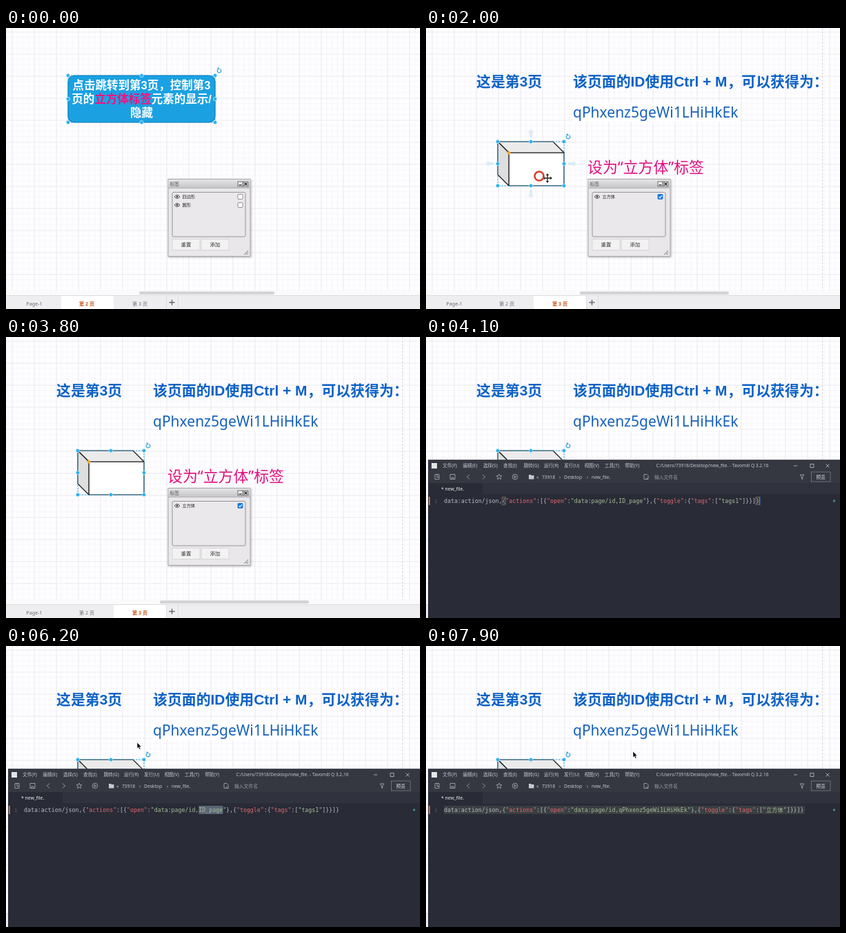
These frames come from a looping animation (600 by 408 pixels, 8 s). An HTML page:

```html
<!DOCTYPE html>
<html lang="zh-CN">
<head>
<meta charset="utf-8">
<style>
  html, body { margin: 0; width: 100%; height: 100%; overflow: hidden; background: #fff; }
  svg { display: block; width: 600px; height: 408px; }
  text { font-family: "Noto Sans", "Noto Sans CJK SC", sans-serif; }
  .title { font-family: "Liberation Sans", "Noto Sans CJK SC", sans-serif; font-weight: 700; }
  .mono { font-family: "DejaVu Sans Mono", "Noto Sans CJK SC", monospace; }
  .mid { text-anchor: middle; }
  .strong { font-weight: 700; }
  .key { fill: #e0696f; }
  .str { fill: #a9bd9b; }
</style>
</head>
<body>
<svg id="stage" viewBox="0 0 600 408"></svg>
<script>
const stage = document.getElementById('stage');
const pageKey = 'qPhxenz5geWi1LHiHkEk';

const text = (x, y, size, str, fill, cls = '') =>
  `<text x="${x}" y="${y}" font-size="${size}" fill="${fill}" class="${cls}">${str}</text>`;
const rect = (x, y, w, h, fill, extra = '') =>
  `<rect x="${x}" y="${y}" width="${w}" height="${h}" fill="${fill}" ${extra}/>`;
const line = (d, stroke, width = 1, extra = '') =>
  `<path d="${d}" fill="none" stroke="${stroke}" stroke-width="${width}" ${extra}/>`;
const group = (id, body) => `<g id="${id}">${body}</g>`;

function selection(x, y, w, h) {
  let out = rect(x, y, w, h, 'none', 'stroke="#29a3e0" stroke-dasharray="2.4 1.6"');
  for (const i of [0, .5, 1]) for (const j of [0, .5, 1])
    if (i !== .5 || j !== .5)
      out += `<circle cx="${x + w * i}" cy="${y + h * j}" r="2.7" fill="#29b0ee" stroke="#e8f6ff" stroke-width=".6"/>`;
  const cx = x + w + 6, cy = y - 7;
  return out + line(`M${cx + 1.6} ${cy - 2.2} A2.8 2.8 0 1 1 ${cx - 1.6} ${cy - 2.2} M${cx - 2.6} ${cy - 3.6} h2.2 v2.2`, '#1f9cd8', 1.1);
}

function tabBar(active, thumbX, thumbW) {
  const tab = (label, i) => {
    const on = i === active;
    return rect([0, 80, 156][i], 389, 76, 19, on ? '#fff' : '#eeeef1') +
      text([41, 117, 194][i], 403, 7.2, label, on ? '#c8571b' : '#6b6b70', on ? 'mid strong' : 'mid');
  };
  return rect(0, 381, 600, 7, '#fafafb') + rect(thumbX, 382.5, thumbW, 4.5, '#d3d3d6', 'rx="2"') +
    rect(0, 388, 600, 20, '#eeeef1') + ['Page-1', '第 2 页', '第 3 页'].map(tab).join('') +
    line('M0 388.5 H600 M232.5 389 V408 M249.5 389 V408', '#dcdce0') +
    line('M236.5 398.5 h8 M240.5 394.5 v8', '#66666b', 1.4);
}

function tagPanel(rows, checked) {
  const button = (x, label) => rect(x, 306.5, 40, 16, '#f3f2f3', 'stroke="#d2d0d2" stroke-width=".8"') +
    text(x + 20, 317.2, 7.4, label, '#333', 'mid');
  const row = (label, i) => {
    const y = 245 + 12 * i;
    return line(`M244 ${y} q4 -5 8 0 q-4 5 -8 0 z`, '#444', .9) + `<circle cx="248" cy="${y}" r="1.4" fill="#444"/>` +
      text(255.5, y + 2.4, 6.2, label, '#222') +
      rect(336, y - 3.5, 7, 7, checked ? '#1473e0' : '#fff', `rx="1" stroke="${checked ? '#1473e0' : '#777'}" stroke-width=".8"`) +
      (checked ? line(`M337.5 ${y} l1.6 1.8 l2.9 -3.6`, '#fff', 1.2) : '');
  };
  return rect(235, 219.5, 119, 112, '#e9e7e9', 'stroke="#a5a5a8" filter="url(#shadow)"') +
    rect(235.5, 220, 118, 12, 'url(#bar)') + line('M235 232.5 H354', '#aaa', .8) +
    text(237.5, 228.8, 6.8, '标签', '#555') +
    [336, 344].map(x => rect(x, 223, 7, 7, '#eee', 'stroke="#555" stroke-width=".8"')).join('') +
    line('M337.5 228 h4', '#111', 1.2) + line('M345.5 224.5 l4 4 m0 -4 l-4 4', '#111', 1.1) +
    rect(241, 238.5, 106, 64.5, '#ebe8eb', 'rx="2" stroke="#8d8b8d" stroke-width=".9"') +
    rows.map(row).join('') + button(241, '重置') + button(283, '添加') +
    [6, 3.5, 1.5].map(d => line(`M${351 - d} 329 l${d} ${-d}`, '#666', .8)).join('');
}

const pageTwo = group('pageTwo',
  rect(90, 69, 213, 68, '#1ba1e2', 'rx="9" stroke="#0072b0" stroke-width="1.2"') +
  ['点击跳转到第3页，控制第3', '页的<tspan fill="#f5107f">立方体标签</tspan>元素的显示/', '隐藏']
    .map((s, i) => text(196.5, 89.3 + 20 * i, 16.5, s, '#fff', 'title mid')).join('') +
  selection(90, 69, 213, 68) + tagPanel(['四边形', '圆形'], false) + tabBar(1, 193, 196));

const hoverArrow = (x, y, angle) =>
  `<path d="M0 -6 l4.5 5 h-2.5 v7 h-4 v-7 h-2.5 z" fill="#dcecf6" transform="translate(${x} ${y}) rotate(${angle})"/>`;

const pageThree = group('pageThree',
  line('M574.5 0 V381', '#d5d5dc', 1, 'stroke-dasharray="3 2"') +
  text(73, 84.5, 20.9, '这是第3页', '#0b61c6', 'title') +
  text(213, 84.5, 20.9, '该页面的ID使用Ctrl + M，可以获得为：', '#0b61c6', 'title') +
  rect(213, 108, 241, 28, '#fff') + text(213, 130, 21, pageKey, '#1560bd') +
  text(234, 209.5, 21.9, '设为“立方体”标签', '#e2107f') +
  `<g stroke="#111" stroke-width="1.1" stroke-linejoin="round">
    <path d="M120 181 H200 V229 H120 z" fill="#fff"/>
    <path d="M104 165 H184 L200 181 H120 z" fill="#ebebeb"/>
    <path d="M104 165 L120 181 V229 L104 213 z" fill="#dedede"/></g>` +
  selection(104, 165, 96, 64) + '<path d="M120 178 l3 3 l-3 3 l-3 -3 z" fill="#f5a623"/>' +
  group('hover', hoverArrow(152, 153, 0) + hoverArrow(212, 197, 90) + hoverArrow(152, 241, 180) + hoverArrow(92, 197, 270)) +
  tagPanel(['立方体'], true) + tabBar(2, 223, 216));

const menus = ['文件(F)', '编辑(E)', '选择(S)', '查找(I)', '跳转(G)', '运行(R)', '发行(U)', '视图(V)', '工具(T)', '帮助(Y)'];
const crumbs = [[160, '«'], [168, '73918'], [193, '›'], [200, 'Desktop'], [233, '›'], [240, 'new_file.']];
const icon = (x, d) => line(d, '#aeb1ba', .8, `transform="translate(${x} 203)"`);
const toolbar =
  icon(16, 'M-3 -3.5 h6 v7 h-6 z M0 -3.5 v4 h3') +
  icon(38.5, 'M-3.5 -3.5 h7 v7 h-7 z M-1.5 3 v-2 h3 v2') +
  icon(61, 'M2 -3.5 l-3.5 3.5 l3.5 3.5') +
  icon(84, 'M-2 -3.5 l3.5 3.5 l-3.5 3.5') +
  icon(106, 'M0 -4 L1.2 -1.3 H4 L1.8 .6 L2.5 3.5 L0 2 L-2.5 3.5 L-1.8 .6 L-4 -1.3 H-1.2 z') +
  icon(129, 'M-3.8 0 a3.8 3.8 0 1 0 7.6 0 a3.8 3.8 0 1 0 -7.6 0 M-1 -1.8 l2.8 1.8 l-2.8 1.8 z') +
  icon(319, 'M-3 -3.5 h4 l2 2 v5 h-6 z M0 1 l3 3') +
  icon(545, 'M-3 -3 h6 l-2.3 3 v3.5 l-1.4 -1 v-2.5 z');

// The code line, built from coloured tokens
const charW = 4.967, codeX = 26;
const uri = rest => ['data', rest].join(':');
const key = s => `<tspan class="key">"${s}"</tspan>`;
const str = s => `<tspan class="str">"${s}"</tspan>`;
const slot = id => `<tspan id="${id}"></tspan>`;
const codeLine = uri('action/json,') + `{${key('actions')}:[{${key('open')}:${str(uri('page/id,') + slot('pageId'))}},` +
  `{${key('toggle')}:{${key('tags')}:[${str(slot('tag'))}]}}]}`;
const bracketBox = i => rect(codeX + i * charW, 232.5, charW, 11, 'none', 'stroke="#8a8068" stroke-width=".7"');

const editor = group('editor',
  rect(3, 178.5, 597, 230, '#292b36') + rect(3, 178.5, 597, 33.5, '#353741') + rect(3, 212, 597, 16.5, '#30323d') +
  rect(4, 212, 78, 17, '#292b36') + line('M3 178.5 H600', '#4a4c55', .8) +
  rect(8, 183, 8, 8, '#e4e5e8') +
  menus.map((m, i) => text(24 + i * 29.35, 189.2, 6.7, m, '#c6c8cf')).join('') +
  text(333.5, 189.2, 6.6, 'C:/Users/73918/Desktop/new_file. - Tavomill Q 3.2.16', '#c6c8cf') +
  line('M533 187 h5 M557 184.5 h5 v5 h-5 z M579.5 184.5 l5 5 m0 -5 l-5 5', '#c6c8cf', .8) +
  toolbar + '<path d="M149 200 h3 l1 1 h3.5 v5.5 h-7.5 z" fill="#c6c8cf"/>' +
  crumbs.map(([x, s]) => text(x, 205.6, 6.7, s, '#c6c8cf')).join('') +
  text(331, 205.6, 6.8, '输入文件名', '#9a9da7') +
  rect(558.5, 196, 27.5, 14, 'none', 'stroke="#72757f" stroke-width=".9"') + text(572, 205.8, 6.8, '预览', '#e2e3e7', 'mid') +
  text(22, 222.8, 6.8, '* new_file.', '#f0f0f2') +
  rect(4, 232, 1.7, 12, '#d9825a') + text(12, 240.8, 7, '1', '#52606a', 'mono') +
  '<circle cx="591.5" cy="238" r="1.8" fill="#3d8791"/>' +
  group('word', rect(279.3, 232, 35, 12, '#5b6675')) + group('all', rect(codeX, 232, 523, 12, '#3a3f42')) +
  group('caret', bracketBox(17) + bracketBox(91) + rect(483.2, 232, 1.2, 12, '#4d83d6')) +
  text(codeX, 240.8, 8.25, codeLine, '#b9bdc6', 'mono'));

const arrowHeads = [0, 90, 180, 270]
  .map(a => `<path d="M7 0 l-3 -2.2 v4.4 z" fill="#222" transform="rotate(${a})"/>`).join('');

stage.innerHTML = `<defs>
  <pattern id="grid" x="8.5" y="5.5" width="32" height="32" patternUnits="userSpaceOnUse">
    <path d="M8 0 V32 M16 0 V32 M24 0 V32 M0 8 H32 M0 16 H32 M0 24 H32" stroke="#f5f4f8"/>
    <path d="M0 0 V32 M0 0 H32" stroke="#e4e3ea" stroke-width="1.6"/>
  </pattern>
  <linearGradient id="bar" x2="0" y2="1"><stop stop-color="#e6e6e7"/><stop offset="1" stop-color="#c5c5c7"/></linearGradient>
  <filter id="shadow"><feDropShadow dx="1" dy="1" stdDeviation="1.5" flood-opacity=".3"/></filter>
</defs>` + rect(0, 0, 600, 408, '#fefdff') + rect(0, 0, 600, 381, 'url(#grid)') + pageTwo + pageThree + editor +
  group('cursor',
    group('arrow', '<path d="M0 0 V8.8 L2 7 L3.4 10.2 L5 9.5 L3.6 6.4 H6.3 z" fill="#111" stroke="#fff" stroke-width=".5"/>') +
    group('move', line('M-5 0 H5 M0 -5 V5', '#222', 1.3) + arrowHeads) +
    group('beam', line('M-1.5 -5 h3 M0 -5 V5 M-1.5 5 h3', '#e8e8ea', .9))) +
  '<circle id="ring" fill="none" stroke="#d8402f"/>';

const el = {};
stage.querySelectorAll('g[id], tspan[id], #ring').forEach(n => el[n.id] = n);
const show = (id, on) => el[id].setAttribute('display', on ? 'inline' : 'none');

// Pointer stops: time, x, y
const stops = [
  [0, 590, -9], [100, 500, 45], [200, 340, 95], [300, 229, 117], [1000, 229, 117],
  [1300, 196, 396], [1500, 195, 396], [1900, 174, 221], [2000, 176, 218], [2100, 178, 219],
  [2300, 255, 263], [2600, 337, 245], [2900, 337, 246], [3200, 241, 124], [3300, 241, 124],
  [3500, 468, 119], [3700, 189, 387], [4200, 215, 402], [4900, 300, 375], [5300, 300, 243],
  [5500, 307, 241], [5900, 306, 244], [6200, 190, 140], [6700, 585, 13], [6900, 588, -6],
  [7100, 588, -12], [7500, 500, 236], [7700, 504, 236], [7900, 300, 153], [8000, 300, 153]
];

function pointerAt(t) {
  const i = stops.findIndex(s => s[0] > t);
  const [t0, x0, y0] = stops[i - 1], [t1, x1, y1] = stops[i];
  const k = (t - t0) / (t1 - t0);
  return [x0 + (x1 - x0) * k, y0 + (y1 - y0) * k];
}

function draw(now) {
  const t = Math.floor(now % 8000 / 100) * 100;
  const within = (a, b) => t >= a && t < b;
  show('pageTwo', t < 1500);
  show('pageThree', t >= 1500);
  show('hover', within(1800, 2300));
  show('editor', t >= 4100);
  show('caret', within(4100, 5400));
  show('word', within(5400, 7200));
  show('all', t >= 7600);
  el.pageId.textContent = t < 7200 ? 'ID_page' : pageKey;
  el.tag.textContent = t < 7500 ? 'tags1' : '立方体';

  const [x, y] = pointerAt(t);
  const move = within(1800, 2200), beam = within(5200, 6000);
  el.cursor.setAttribute('transform', `translate(${x} ${y})`);
  show('cursor', !within(3800, 4200));
  show('move', move);
  show('beam', beam);
  show('arrow', !move && !beam);

  const big = within(2000, 2100);
  show('ring', big || within(1400, 1500) || within(5400, 5600));
  const ring = { cx: big ? 164 : x, cy: big ? 215 : y, r: big ? 6.5 : 2.6, 'stroke-width': big ? 2.6 : 1.8 };
  for (const name in ring) el.ring.setAttribute(name, ring[name]);
}

const start = performance.now();
(function loop() {
  draw(performance.now() - start);
  requestAnimationFrame(loop);
})();
</script>
</body>
</html>
```
